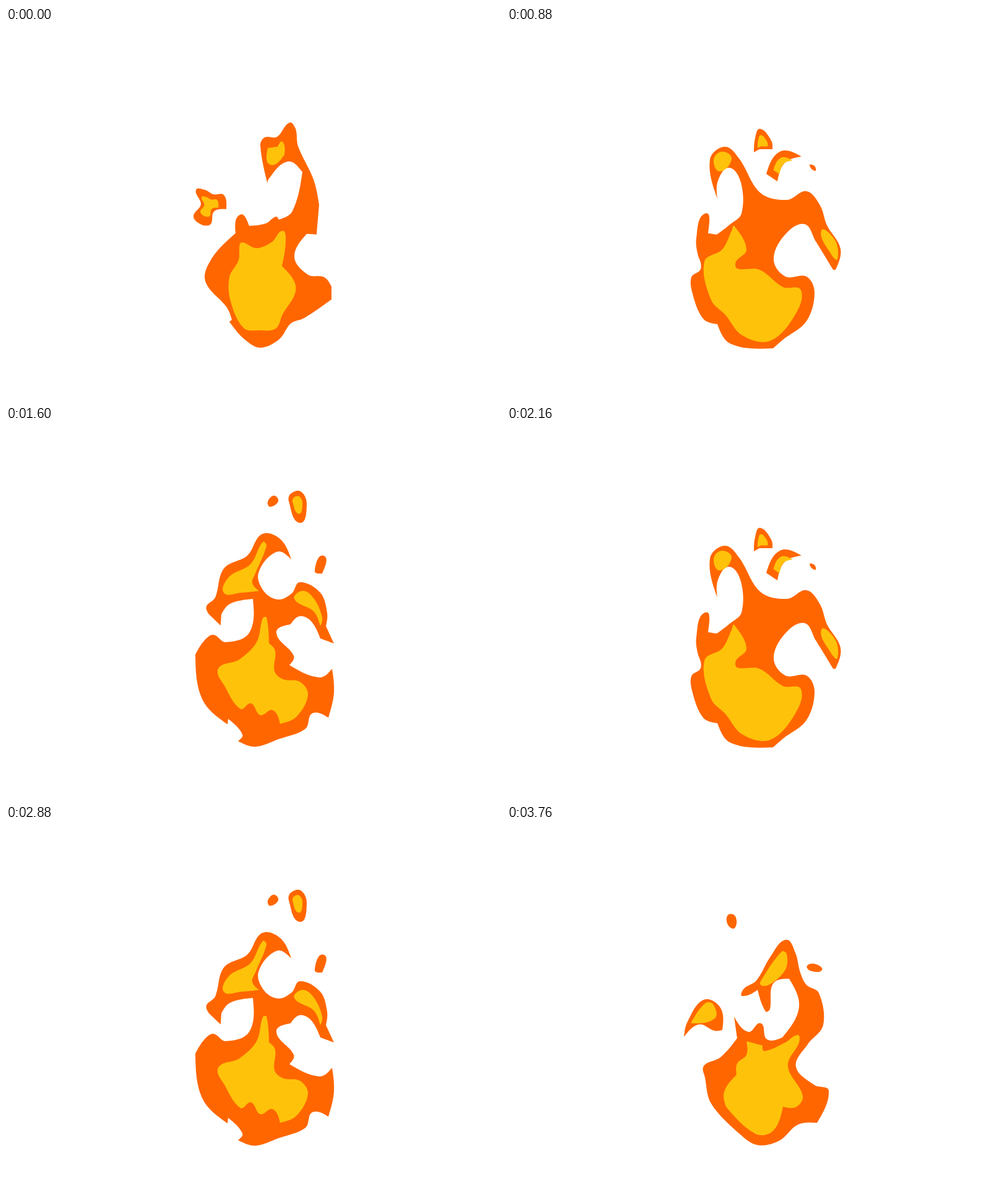
Animation, 800 px wide and 600 px high, one loop 3840 ms. Source, as an HTML page with a canvas:

```html
<!DOCTYPE html>
<html lang="en">
<head>
<meta charset="utf-8">
<title>Flame</title>
<style>
  html, body { margin: 0; width: 100%; height: 100%; overflow: hidden; background: #fff; }
  canvas { display: block; }
</style>
</head>
<body>
<canvas id="stage" width="800" height="600"></canvas>
<script>
const STEP = 80, STEPS = 16;
const BOX = { x: 270, y: 80, w: 290, h: 450 };
const BASE = 515 - BOX.y, GROWTH = 1.06, CORE = 0.55;
const OUTER = [255, 102, 0], INNER = [255, 194, 10];

// Key poses: smooth closed curves through a few points, * marks a corner.
// Each spark gets a core that is its own outline, scaled down.
const poses = [
  { step: 0,
    outer: [
      `458,153 468,163 472,191 497,245 506,286* 502,334* 486,333* 466,370 488,399 514,403 526,418* 526,439*
       482,469 460,478 442,503 411,517 385,503 361,475* 365,472* 357,452 322,409 333,372 371,332* 378,302 393,320*
       420,316 436,305 441,310* 463,296 479,233* 455,216 424,245 424,257* 411,190 418,177 438,176`],
    inner: [
      `447,328 452,345 446,385* 466,410 467,430 447,463 436,486 410,489 384,485 363,442 361,403 376,375 378,349
       384,347 405,356 430,346`,
      `423,194* 439,192* 447,184 450,205* 427,221`],
    sparks: [`307,262 322,262 335,269 352,270 356,293* 336,297 331,317 318,319* 303,305 315,285`] },
  { step: 4,
    outer: [
      `414,173 443,181 461,214* 437,202 408,236 417,266 440,279 462,269 475,251 508,268 519,300 517,322* 530,350*
       508,342* 493,314 475,306 460,319* 437,333 465,370 458,385* 506,405 527,391* 530,430 521,470* 495,463 484,488
       440,505 403,517 375,508* 382,497 359,472* 358,481* 317,440 306,368* 320,346 335,336 355,348 393,333 399,278*
       362,286 348,303* 347,321* 328,303* 324,290 338,276 352,229 390,208`,
      `433,111 440,120 427,129 423,121`,
      `513,208 511,237* 499,233`],
    inner: [
      `415,309 421,308 425,350* 435,362 434,395 448,408 475,412 488,433 470,468 443,480* 431,458 411,466 396,447
       379,456 354,420 343,391 377,376 405,348`,
      `415,186 421,192 403,237 398,252 409,265* 380,268 352,268 361,242 395,222`,
      `466,278 480,265 498,278 511,308 508,322* 497,298`],
    sparks: [`460,108 476,104 486,124 475,155 457,120`] },
  { step: 8,
    outer: [
      `327,224* 343,200 365,180 415,190 428,190* 441,222 415,249* 447,271 470,259 487,240 518,251 538,292* 508,279
       481,297 472,328 486,346 514,357 520,388 528,406 516,430 489,462* 480,440* 440,454 418,500 396,512 362,495*
       360,478 326,422 336,401* 332,377 360,347 378,339 388,346 427,304 420,270 384,257* 352,215`,
      `364,143 379,155 380,168 367,158`,
      `472,179 476,190 453,208 459,195`],
    inner: [
      `446,305 456,330 474,353* 495,370 506,408 497,422 457,419* 428,443 402,467* 396,479 365,451 361,434 372,422*
       353,392 358,377 380,370 409,368* 432,314`,
      `345,210* 345,204 367,187 423,206 406,243 390,228 376,212`,
      `474,266 492,254 523,272* 494,276`],
    sparks: [`318,240 328,241 331,252 327,263 317,263`] },
  { step: 11,
    outer: [
      `352,192 375,211 410,267 453,278 484,264 506,287 517,319 539,357 531,391* 527,391* 499,345 480,317 447,337
       431,375 450,402 484,402 497,428 484,474 446,504 430,518* 362,511 340,479* 317,470 300,430* 298,403 313,390
       309,369* 306,340 320,300 325,332* 339,334* 360,318 379,300 378,250 359,226 341,247 340,276* 328,213`,
      `489,222 497,223 498,231`],
    inner: [
      `367,320 387,358 370,378 372,389 408,391 446,419 475,424 465,465 425,506 380,497 353,464 330,440 319,378
       348,358 363,328`,
      `347,200 363,211 344,232 334,213`,
      `508,328 530,343 534,374 524,366`],
    sparks: [
      `409,163 427,182 429,196* 408,196* 399,201* 401,178`,
      `441,200 476,208* 449,218 437,248* 419,236*`] },
  { step: 15,
    outer: [
      `451,184 466,205 474,237 484,257 504,270 511,322 486,353 467,389 497,419 520,428 501,480* 470,483 440,509
       405,516 376,498 330,449 320,407 318,388 345,374 372,343* 367,308* 390,333 410,319 418,343 428,347 445,342*
       472,293 456,247* 430,255 425,296 418,300 405,265* 380,275 383,263 403,250 426,211`,
      `286,341* 292,316 318,281 345,294 348,330* 335,331 310,321`,
      `357,144 369,146 368,165 357,160`,
      `485,226 498,223 509,233 490,234`],
    inner: [
      `470,338 472,350 454,388 478,436 468,454 446,454* 430,493 402,498 354,454* 351,430 371,402* 372,384 387,370
       387,348* 413,355* 416,364 450,350`,
      `444,203 452,207 450,232 425,256 410,257 413,246`,
      `320,287 333,288 336,311 297,319*`],
    sparks: [] }
];

const mix = (a, b, t) => a + (b - a) * t;
const clamp = (v, low, high) => Math.max(low, Math.min(high, v));

function outline(text, scale = 1) {
  const points = text.trim().split(/\s+/).map(token => {
    const [x, y] = token.split(',').map(parseFloat);
    return { x, y, corner: token.endsWith('*') };
  });
  const mean = axis => points.reduce((sum, p) => sum + p[axis], 0) / points.length;
  const cx = mean('x'), cy = mean('y');
  for (const p of points) {
    p.x = mix(cx, p.x, scale);
    p.y = mix(cy, p.y, scale);
  }

  const at = i => points[(i + points.length) % points.length];
  const handle = (i, length) => {
    const p = at(i), a = at(i - 1), b = at(i + 1);
    const k = p.corner ? 0 : length / 3 / (Math.hypot(b.x - a.x, b.y - a.y) || 1);
    return { x: p.x + (b.x - a.x) * k, y: p.y + (b.y - a.y) * k };
  };
  const middle = (a, b) => ({ x: mix(a.x, b.x, 0.5), y: mix(a.y, b.y, 0.5) });

  const path = new Path2D();
  path.moveTo(points[0].x, points[0].y);
  points.forEach((p, i) => {
    const q = at(i + 1), length = Math.hypot(q.x - p.x, q.y - p.y);
    const out = handle(i, length), back = handle(i + 1, -length);
    const c1 = p.corner ? middle(p, back) : out;
    const c2 = q.corner ? middle(q, out) : back;
    path.bezierCurveTo(c1.x, c1.y, c2.x, c2.y, q.x, q.y);
  });
  path.closePath();
  return path;
}

function newLayer() {
  const layer = document.createElement('canvas');
  layer.width = BOX.w;
  layer.height = BOX.h;
  const ctx = layer.getContext('2d', { willReadFrequently: true });
  ctx.translate(-BOX.x, -BOX.y);
  return ctx;
}

function drawPose(pose, coreOnly = false) {
  const ctx = newLayer();
  const fill = (color, shapes, scale) => {
    ctx.fillStyle = `rgb(${color})`;
    for (const shape of shapes) ctx.fill(outline(shape, scale));
  };
  if (!coreOnly) fill(OUTER, [...pose.outer, ...pose.sparks]);
  fill(INNER, pose.inner);
  fill(INNER, pose.sparks, CORE);
  return ctx;
}

// Two-pass chamfer distance to the nearest pixel that is not `inside`.
function distances(inside) {
  const { w, h } = BOX, d = new Float32Array(w * h);
  for (let i = 0; i < d.length; i++) d[i] = inside(i) ? 999 : 0;
  const sweep = (i, s) => {
    const x = i % w, get = j => (j >= 0 && j < d.length ? d[j] : 999);
    const side = s > 0 ? x > 0 : x < w - 1, other = s > 0 ? x < w - 1 : x > 0;
    d[i] = Math.min(d[i], get(i - s * w) + 1,
      side ? Math.min(get(i - s) + 1, get(i - s * (w + 1)) + Math.SQRT2) : 999,
      other ? get(i - s * (w - 1)) + Math.SQRT2 : 999);
  };
  for (let i = 0; i < d.length; i++) sweep(i, 1);
  for (let i = d.length - 1; i >= 0; i--) sweep(i, -1);
  return d;
}

function signedField(ctx) {
  const { data } = ctx.getImageData(0, 0, BOX.w, BOX.h);
  const solid = i => data[i * 4 + 3] > 127;
  const inside = distances(solid), outside = distances(i => !solid(i));
  return inside.map((v, i) => v - outside[i]);
}

// Blend two poses while both drift upwards, faster with height.
function blend(a, b, step) {
  const { w, h } = BOX, ctx = newLayer(), image = ctx.createImageData(w, h);
  const u = (step - a.step) / (b.step - a.step);
  const row = (y, n) => w * clamp(Math.round(BASE - (BASE - y) * GROWTH ** n), 0, h - 1);
  for (let y = 0; y < h; y++) {
    const rowA = row(y, a.step - step), rowB = row(y, b.step - step);
    for (let x = 0; x < w; x++) {
      const cover = part => clamp(mix(a[part][rowA + x], b[part][rowB + x], u) + 0.5, 0, 1);
      const core = cover('coreField'), i = (y * w + x) * 4;
      for (let c = 0; c < 3; c++) image.data[i + c] = mix(OUTER[c], INNER[c], core);
      image.data[i + 3] = 255 * cover('field');
    }
  }
  ctx.putImageData(image, 0, 0);
  return ctx.canvas;
}

for (const pose of poses) {
  pose.field = signedField(drawPose(pose));
  pose.coreField = signedField(drawPose(pose, true));
}

const drawings = Array.from({ length: STEPS }, (_, step) => {
  const next = poses.findIndex(pose => pose.step >= step);
  return poses[next].step === step
    ? drawPose(poses[next]).canvas
    : blend(poses[next - 1], poses[next], step);
});

const stage = document.getElementById('stage').getContext('2d');
const start = performance.now();

function render() {
  const step = Math.floor((performance.now() - start) / STEP) % STEPS;
  stage.clearRect(0, 0, 800, 600);
  stage.drawImage(drawings[step], BOX.x, BOX.y);
  requestAnimationFrame(render);
}
render();
</script>
</body>
</html>
```
